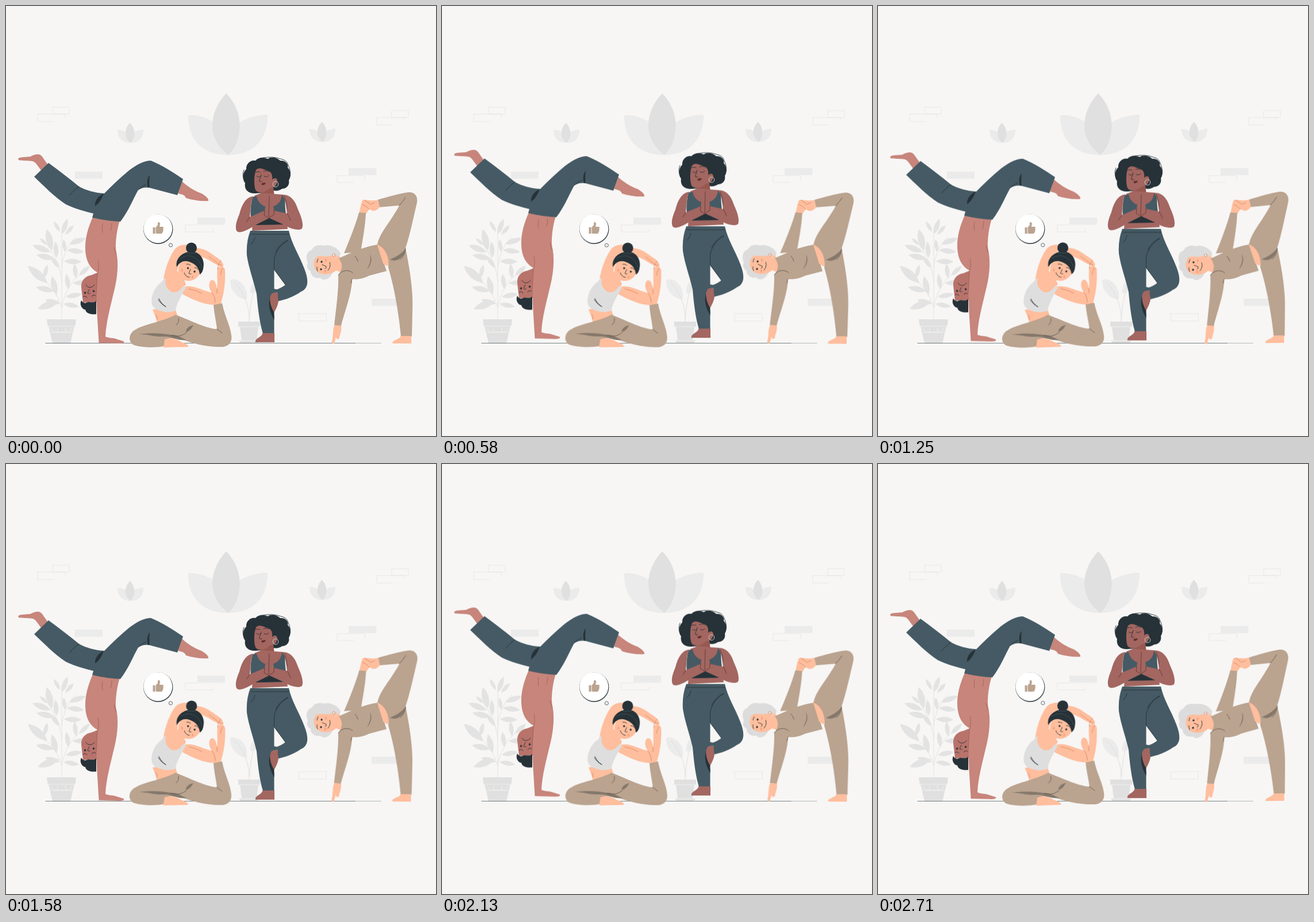
Animation, 748 px wide and 748 px high, one loop 2750 ms. Source, as an HTML page:

```html
<!DOCTYPE html>
<html lang="en">
<head>
<meta charset="utf-8">
<title>Yoga group</title>
<style>
html, body { margin: 0; width: 100%; height: 100%; overflow: hidden; background: #f7f6f5; }
svg { display: block; width: 100%; height: 100%; }
.line { fill: none; stroke: #263238; stroke-width: .9; stroke-linecap: round; stroke-linejoin: round; }
.brick { fill: none; stroke: #e6e6e4; stroke-width: .9; }
.pale { fill: #ebebeb; }
.grey { fill: #e0e0e0; }
.ink { fill: #263238; }
.navy { fill: #455a64; }
.sand { fill: #baa38f; }
.shade { fill: #85786b; }
.rose { fill: #c7857b; }
.brown { fill: #a36660; }
.peach { fill: #ffbe9d; }

/* Drawn at 24 pictures a second: 18 steps = 750 ms */
.float, .sway { animation: float 2750ms -4ms infinite; }
.sway { animation-name: sway; }
@keyframes float {
  0% { transform: translateY(0); animation-timing-function: steps(18); }
  27.2727% { transform: translateY(-10px); animation-timing-function: steps(18); }
  54.5455% { transform: translateY(0); animation-timing-function: steps(18); }
  81.8182% { transform: translateY(-10px); animation-timing-function: steps(12); }
  100% { transform: translateY(-3.333px); }
}
@keyframes sway {
  0% { transform: rotate(0deg); animation-timing-function: steps(9); }
  13.6364% { transform: rotate(1deg); animation-timing-function: steps(18); }
  40.9091% { transform: rotate(-1deg); animation-timing-function: steps(18); }
  68.1818% { transform: rotate(1deg); animation-timing-function: steps(18); }
  95.4545% { transform: rotate(-1deg); animation-timing-function: steps(3); }
  100% { transform: rotate(-.667deg); }
}
</style>
</head>
<body>
<svg viewBox="0 0 748 748">
  <defs>
    <g id="lotus">
      <path class="pale" d="M317 190C316 231 341 260 387 259C431 259 456 231 455 189C437 189 421 194 405 203L361 202C348 194 333 189 317 190Z"/>
      <path class="grey" d="M383 152C367 169 359 189 359 207C359 231 371 247 387 259C400 246 406.500 229 406.500 207C406.500 187 398 167 383 152Z"/>
    </g>
    <path id="bricks" class="brick" d="M26 12V0H55V12H27M28 25H0V12H48V18"/>
  </defs>

  <!-- wall -->
  <use href="#bricks" x="55" y="176"/>
  <use href="#bricks" x="645" y="182"/>
  <path class="brick" d="M576 307V295H624V304M576 307H605M360 388V393H312V381H333M509 548V535H557V548Z"/>
  <path class="pale" d="M120 288h48v12.500h-48zM596 282h48.500v12h-48.500zM333 368h48v12.500h-48zM636 509h48v12.500h-48z"/>
  <use href="#lotus"/>
  <use href="#lotus" transform="translate(90.700 153.600) scale(.326)"/>
  <use href="#lotus" transform="translate(424.700 152) scale(.326)"/>

  <!-- plants -->
  <g id="leaves" fill="#e3e3e3"></g>
  <path fill="none" stroke="#e3e3e3" stroke-width="1" d="M97 546V392M97 480C94 445 78 425 70 412M97 525C86 490 68 475 50 470M97 455C101 425 112 410 122 402M97 525C103 490 121 470 138 462"/>
  <path class="grey" d="M71 545H122L120.500 557H72.500ZM74 557H119L112 587H81Z"/>
  <path fill="none" stroke="#f1f1f0" stroke-width=".9" d="M73 557H120M77 568H116M78 560L83 567H90V559M90 567H104V559M104 567H110L115 560"/>
  <path class="pale" d="M390 480C388 473 401 474 409 481C418 489 421 501 418 511C402 508 391 497 390 480ZM438 474C429 479 423 489 425 500C433 500 438 495 440 488Z"/>
  <path fill="none" stroke="#e3e3e3" stroke-width="1.200" d="M398 481C416 500 424 525 423 549M436 480C426 505 424 530 423 549"/>
  <path class="grey" d="M404 549H442V558H404ZM407 558H439L436 582H410ZM405 582H441L438 586H408Z"/>
  <path fill="none" stroke="#f1f1f0" stroke-width=".9" d="M405 558H441M409 582H437"/>

  <path class="line" stroke-width=".7" stroke-opacity=".65" d="M69 586.500H607"/>
  <path class="line" stroke-width=".7" stroke-opacity=".35" d="M607 586.500H652"/>

  <!-- handstand -->
  <g class="float">
    <path fill="#b8736b" d="M131 490C130 478 137 470 149 468L168 460V514L134 516Z"/>
    <path class="ink" d="M131 512C127 520 133 528 138 528C139 535 148 537 157 536V513C151 518 145 513 140 516C136 518 133 515 131 512Z"/>
    <path class="line" d="M145 493C142 498 140 501 146 500M139 485C142 491 150 491 154 485M134 506Q137 503 141 507M149 505Q153 501 156 504"/>
    <circle class="ink" cx="137.500" cy="499" r="1.800"/><circle class="ink" cx="152.500" cy="496" r="1.800"/>
    <path class="rose" d="M21 266C23 262 34 263 42 262C48 259 56 256 61 260C65 264 68 270 74 277L61 286C57 281 54 275 49 271C42 268 28 270 22 268Z"/>
    <path class="rose" d="M306 305C315 313 326 321 340 326C347 330 353 335 352 339C340 340 325 338 313 334C311 329 308 328 299 326Z"/>
    <path class="rose" d="M151 367C143 385 137 404 138 425C139 443 146 457 160 464C157 485 157 515 159 545L161.500 586L198 587C205 587 207 584 204 583L188 578C181 577 177 577 173 575C174 550 182 522 186 504C191 486 195 464 194 445C194 433 190 426 191 413C192 397 194 386 198 373Z"/>
    <path class="line" style="stroke:#a4635b" d="M160 464C161 457 162 449 160 443M168 379C167 385 167 389 168 394M184 378Q184 385 182 391M159 466L157 500M192 432Q189 427 188 420"/>
    <path class="navy" d="M74 273L49 297C65 312 85 333 104 345C120 353 137 357 152 361L150 368Q175 374 199 375C213 357 221 336 230 320C236 316 242 315 249 316L298 329L308 301C290 289 272 277 252 269C240 269 227 276 214 286C198 299 184 313 171 326C154 325 140 321 127 314C110 300 92 286 74 273Z"/>
    <path class="ink" d="M170 326C160 331 154 339 155 348C161 344 166 337 170 326ZM250 294C245 300 245 309 247 316L249.500 316C249 308 249 301 250 294Z"/>
    <path class="line" d="M127 314C122 317 116 323 111 329M230 320C233 316 238 313 243 311"/>
  </g>

  <!-- tree pose -->
  <g class="float">
    <path class="ink" d="M433 326C420 326 414 318 416 308C410 301 412 289 418 284C417 274 426 267 434 269C440 262 450 263 455 266C462 261 472 264 477 269C486 268 492 275 490 281C497 288 495 299 492 303C494 313 487 318 480 318C474 323 463 322 460 318L446 325Z"/>
    <path class="line" d="M447 264Q465 261 478 266Q489 268 491 277Q496 287 494 296M414 285Q410 294 414 302"/>
    <path fill="#96584f" d="M445 318L464 307L467 331L453 341L442 331Z"/>
    <path class="brown" d="M435 285C431 294 431 312 434 320C439 327 451 325 459 317C465 317 472 312 472 304C471 298 466 299 463 302C464 294 462 288 454 286C448 285 442 279 435 285Z"/>
    <path class="line" d="M436 296Q440 299 443 296M449 296Q453 299 457 295M434 289Q438 287 442 289M448 288Q453 285 457 288M444 293C443 299 440 302 441 305Q443 306 445 305"/>
    <path fill="#632f2e" d="M444 309Q449 306 452 308Q449 313 445 311Z"/>
    <circle cx="469" cy="310" r="4.800" fill="none" stroke="#ccc"/>
    <path class="brown" d="M432 330L445 325L467 327L481 328L490 388L428 391Z"/>
    <path class="navy" d="M429 332L436 331C438 343 448 350 458 350C470 349 479 342 480 329L486 330C484 350 488 365 489 380L428 381C424 365 425 346 429 332Z"/>
    <path class="brown" d="M430 331C416 333 410 347 406 362C401 374 398 384 401 391C406 398 423 388 434 381L458 369L482 380C493 387 509 392 515 387C518 380 514 367 508 354C503 339 496 328 480 328C487 337 487 347 489 361L466 356C465 345 462 337 459 329C455 336 451 346 450 356L424 367C426 353 425 341 430 331Z"/>
    <path class="ink" d="M434 381L458 369L482 380Z"/>
    <path class="line" style="stroke:#633b38" d="M458 331L457 367M450 356L449 364L457 369L466 363V356M424 367L419 375M489 361Q493 367 495 373M484 331Q489 342 489 352"/>
    <path class="brown" d="M459 501C456 512 460 527 463 538C469 530 473 520 474 510L473 499Z"/>
    <path class="navy" d="M425 391H492C497 414 510 433 519 457C528 480 525 492 513 497C500 506 486 511 471 514L473 499C467 498 463 500 461 502L462 532L466.500 538V570H447C441 550 438 525 436 501C430 475 422 455 419 434C418 418 420 404 425 391Z"/>
    <path fill="#f7f6f5" d="M466.500 459L486 485Q478 491 471 493L466.500 492Z"/>
    <path class="brown" d="M472 499C462 497 458 504 459 515C460 524 462 530 464 535C469 529 473 521 474 513Z"/>
    <path class="ink" d="M459 507C456 520 458 531 466.500 546V533C462 526 459 517 459 507Z"/>
    <path class="line" d="M466.500 458V440C469 426 479 414 490 408M490 407Q475 415 469 428M426 397H492M433 403Q431 411 426 415M467 459L486 485"/>
    <path class="brown" d="M446 569H467V585H434C432 579 442 577 446 571Z"/>
  </g>

  <!-- seated pose -->
  <g class="sway" style="transform-origin:303.500px 503px">
    <path class="peach" d="M273 486C274 464 282 440 293 424C299 416 309 414 318 416L312 434C300 446 296 459 298 471Z"/>
    <path class="peach" d="M329 421C346 420 357 431 368 438C374 442 379 448 378 453C375 456 367 450 359 446C350 440 341 435 331 435Z"/>
    <path class="peach" d="M298 461C294 472 284 478 275 482L262 527L255 528C260 540 263 550 264 557L299 541L294 525L306 494L313 484L307 470Z"/>
    <path class="peach" d="M303 493C314 483 329 489 343 494L358 499C352 490 352 480 357 477C363 475 366 484 367 492C369 480 366 468 368 457C370 450 380 453 381 459C382 482 379 502 373 520H363C344 520 324 510 308 502Z"/>
    <path class="line" style="stroke:#d4896a" d="M353 436L365 445Q369 450 375 451M368 458Q368 450 374 443M358 499Q364 505 364 516M367 492L367 500M377 456Q373 463 373 468M318 492Q330 494 341 500M261 537Q264 541 263 545M272 547V549"/>
    <path fill="#dedede" d="M275 474L271 480C258 488 251 507 254 519C256 526 263 529 271 531C281 534 289 532 295 530C296 520 303 508 307 500L313 490L308 487C303 496 294 501 286 496C278 490 276 482 278 474Z"/>
    <path class="line" d="M266 509Q270 518 278 523M265 511Q271 520 278 523"/>
    <path class="peach" d="M306 441C299 452 297 466 303 473C314 482 330 479 337 466L343 449L322 432Z"/>
    <circle class="ink" cx="322.500" cy="421" r="9.500"/>
    <path class="ink" d="M297 454C294 439 307 428 322 427C338 427 347 442 343 457C342 463 339 466 337 467C336 457 331 449 319 445C311 442 303 444 297 454Z"/>
    <path class="line" style="stroke:#52616a;stroke-width:.6" d="M303 439Q316 431 327 437Q338 443 341 455M314 430H329"/>
    <circle class="ink" cx="316.500" cy="456" r="1.700"/><circle class="ink" cx="328" cy="462" r="1.700"/>
    <path class="line" d="M314 449Q318 448 321 451M328 455Q332 455 334 458M321 458L318 465Q320 467 322 466M310 464Q312 471 319 472"/>
    <path fill="#f6a17f" d="M305 457a3 2.500 0 1 1 0 5zM323 469a3 2.500 0 1 1 0 5z"/>
    <path class="sand" d="M295 537C273 549 242 553 227 562C213 568 211 585 223 590C239 595 261 594 274 592L284 578L303 579C322 586 347 593 371 593C387 594 394 585 392 573C390 555 380 539 376 517L361 520C362 535 366 550 367 562C348 561 326 549 295 537Z"/>
    <path class="shade" d="M231 571C250 568 272 569 287 572C302 572 304 578 315 581C296 583 289 574 275 575C257 576 245 570 231 571ZM326 555C317 557 313 562 313 567C319 566 323 561 326 555Z"/>
    <path class="line" style="stroke:#665b50" d="M287 573C299 576 306 574 314 568M300 543Q302 550 296 555M367 562L376 569"/>
    <path class="peach" d="M276 580C286 576 298 580 304 584C312 587 318 589 317 593L274 594Z"/>
  </g>

  <!-- balancing pose -->
  <g class="sway" style="transform-origin:619px 456px">
    <path class="peach" d="M620 338C625 335 633 341 647 337L650 350C643 358 638 358 632 353L626 362H614C616 353 617 345 620 338Z"/>
    <path class="line" style="stroke:#d4896a" d="M620 345L627 349L632 354M624 338L634 345L641 342"/>
    <path class="sand" d="M588 430C598 406 608 381 614 359L626 360C625 384 620 408 617 428Z"/>
    <path fill="#dcdcdc" d="M525 447C520 435 524 427 532 424C536 416 546 415 553 417C563 414 577 420 582 430L576 450L566 468C560 477 551 478 547 473C537 475 529 468 530 461C524 458 522 453 525 447Z"/>
    <path class="peach" d="M538 439C533 448 535 459 544 464C553 469 567 467 574 460L585 464L584 440L573 429C561 435 549 426 538 439Z"/>
    <path fill="#dcdcdc" d="M539 437C548 432 555 438 566 434L574 440L580 430C570 418 549 417 539 437Z"/>
    <path class="peach" d="M567 432C571 428 577 432 575 437L570 441Z"/>
    <circle cx="570" cy="433" r="2" fill="#fff" stroke="#888" stroke-width=".7"/>
    <circle class="ink" cx="549" cy="445" r="1.700"/><circle class="ink" cx="548" cy="458" r="1.700"/>
    <path class="line" d="M543 440Q541 443 541 446M541 454Q540 458 542 461M550 450L557 453Q558 456 555 457M563 446Q566 453 560 460"/>
    <path fill="#f6a17f" d="M555 440a3 2.500 0 1 1 0 5zM554 459a3 2.500 0 1 1 0 5z"/>
    <path class="peach" d="M572 554H583C585 566 580 571 580 578L576 580L574 576L571 587C568 588 566 586 567 583C570 574 567 564 572 554Z"/>
    <path class="sand" d="M579 439C598 430 624 418 647 415L662 461L632 469C620 475 610 476 602 475C602 499 589 532 583 556L571 555C574 527 579 493 578 468C585 460 587 449 579 439Z"/>
    <path class="line" style="stroke:#665b50" d="M578 468C584 459 596 458 603 464M602 475L600 482M607 435Q611 439 612 444"/>
    <path class="shade" d="M633 432C638 440 635 451 628 458C634 447 635 441 633 432Z"/>
    <path class="peach" d="M645 413L657 420C666 430 667 446 664 453L656 448Z"/>
    <path class="sand" d="M647 337C664 332 684 326 700 324C713 323 718 334 714 346C708 371 703 397 695 421C701 452 709 493 707 531L706 575H687C684 540 676 491 665 455C668 434 657 419 646 415C648 401 660 385 669 372C676 361 682 352 684 347L650 350Z"/>
    <path class="shade" d="M695 422C689 430 680 436 668 441C675 445 690 443 695 424Z"/>
    <path class="line" style="stroke:#665b50" d="M684 347Q690 341 695 333M695 422Q694 434 686 441"/>
    <path class="peach" d="M686 574H705V587H673C670 582 682 580 686 576Z"/>
  </g>

  <!-- thought bubble -->
  <g class="sway" style="transform-origin:265px 391px">
    <circle class="ink" cx="264.700" cy="388.200" r="25.700"/>
    <circle cx="264.300" cy="387.300" r="25.100" fill="#fff"/>
    <circle cx="286.500" cy="416" r="3" fill="#fff" stroke="#263238" stroke-width=".8"/>
    <path class="sand" d="M255.500 385H259.500V396H255.500ZM260.500 385L264 381V377C265 375 268 376 268 379L267 384H272C275 384 274 387 273 387.500C274.500 388.500 274 390 273 390.500C274 392 273 393 272 393.500C273 395 271 396 270 396H262L260.500 395Z"/>
  </g>
</svg>
<script>
// base x, base y, tip x, tip y
const leaves = [
  [97, 397, 107, 370], [94, 393, 83, 374], [103, 398, 118, 381],
  [80, 425, 71, 388], [88, 438, 86, 410], [72, 416, 59, 404],
  [78, 428, 46, 416], [85, 440, 53, 433], [93, 456, 78, 436],
  [72, 482, 38, 452], [66, 474, 72, 450], [56, 472, 46, 464],
  [84, 496, 52, 489], [88, 503, 80, 470], [92, 513, 55, 527], [94, 518, 68, 511],
  [103, 428, 100, 406], [110, 414, 139, 404], [106, 424, 136, 428],
  [101, 444, 131, 445], [122, 474, 119, 448], [127, 469, 146, 452],
  [116, 482, 143, 481], [109, 493, 105, 466], [104, 506, 132, 501],
  [100, 518, 127, 523]
];
const shape = ([x, y, u, v]) => {
  const dx = (u - x) * .5, dy = (v - y) * .5, w = .62;
  return `M${x} ${y}Q${x + dx - dy * w} ${y + dy + dx * w} ${u} ${v}Q${x + dx + dy * w} ${y + dy - dx * w} ${x} ${y}Z`;
};
document.getElementById('leaves').innerHTML = `<path d="${leaves.map(shape).join('')}"/>`;
</script>
</body>
</html>
```
